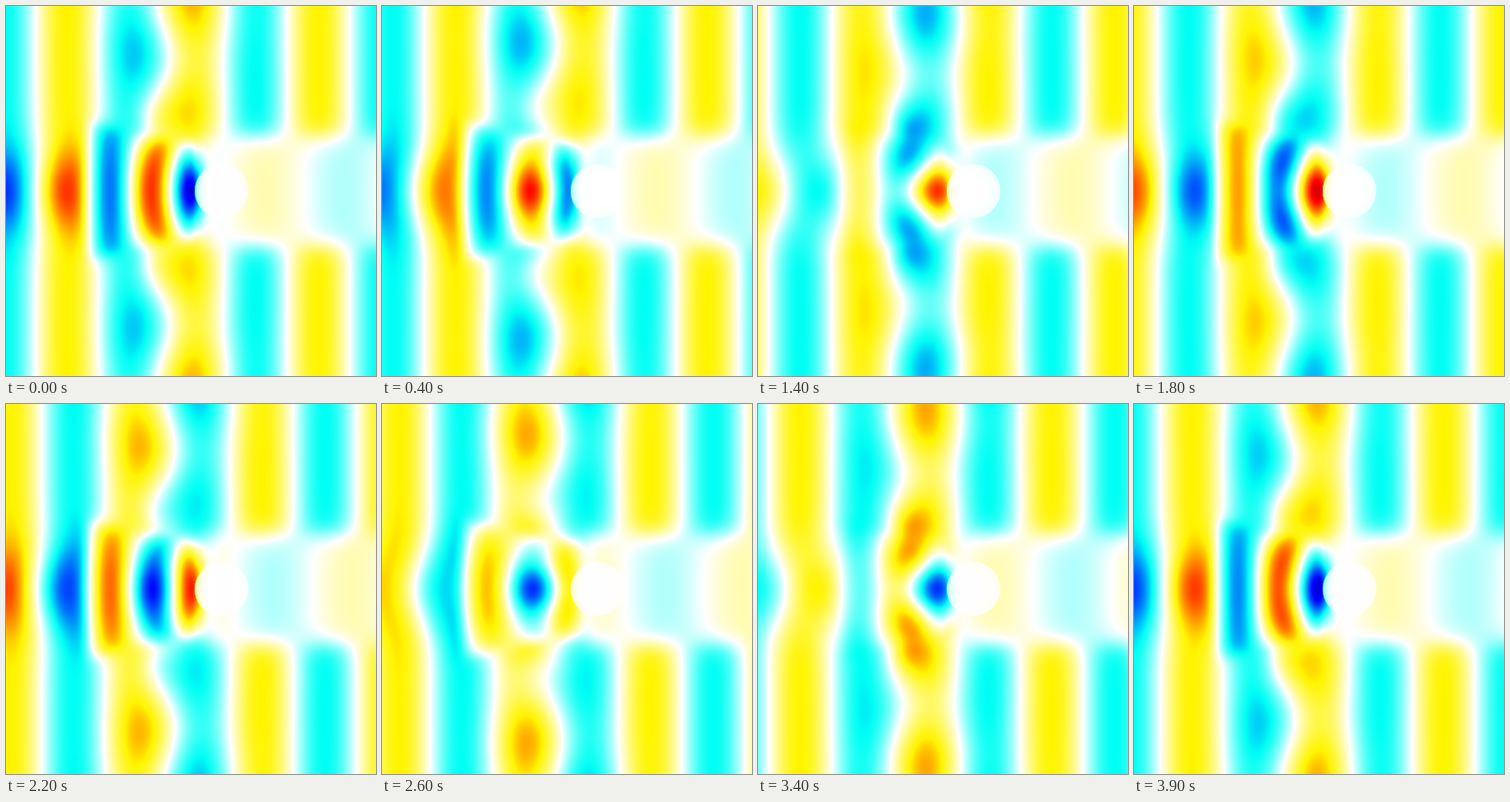
These frames come from a looping animation (400x400 px, 4000 ms). A matplotlib script:

```python
import numpy as np
import matplotlib.pyplot as plt
from matplotlib.animation import FuncAnimation
from matplotlib.colors import LinearSegmentedColormap

SIZE = 400
FRAMES = 40
INTERVAL = 100
K = 2 * np.pi / 136        # wave number of the open field
K_BLOCK = 2 * np.pi / 88   # shorter waves inside the block
BLOCK_X = 150
DISC_X, DISC_R = 233, 29


def step(v, softness):
    """Smooth switch from 0 to 1 as v passes zero."""
    return 0.5 + 0.5 * np.tanh(v / (2 * softness))


def bell(v, width):
    return np.exp(-(v / width) ** 2)


def mix(a, b, weight):
    return a + (b - a) * weight


def open_field():
    """Plane wave plus waves thrown sideways and straight back."""
    r = np.hypot(x - BLOCK_X, dy)
    cos_angle = (x - BLOCK_X) / np.maximum(r, 1)
    sideways = 68 / (r + 20) * bell(cos_angle - 0.15, 0.3)
    back = 0.8 * bell(dy, 45) * step(BLOCK_X - x, 10)
    return np.exp(1j * K * (x - 66)) + (sideways + back) * np.exp(1j * K * (r + 54))


def shadow_field():
    return 0.3 * np.exp(0.8j * K * (x - 280))


def block_field():
    """Standing wave that narrows and bends towards the disc."""
    bend = 12 * (dy / 50) ** 2 * step(x - 140, 12)
    height = 1.5 + 0.8 * (np.clip(x - 90, 0, 115) / 110) ** 2
    spread = 24 + np.maximum(205 - x, 0)
    standing = (height * np.exp(-(dy / spread) ** 2 / 2)
                * np.cos(K_BLOCK * (x - 68 - bend)))
    rim = -0.8 * np.tanh((x - 88 - dy ** 2 / 110) / 40)
    focus = 2.1 * bell(x - 176, 35) * bell(dy, 27)
    return standing + 1j * (rim + focus)


x, y = np.meshgrid(np.arange(SIZE) + 0.5, np.arange(SIZE) + 0.5)
dy = np.abs(y - SIZE / 2)

in_shadow = step(x - 215, 8) * step(60 - dy, 7)
in_block = (step(x - 82, 4) * step(215 - x, 5)
            * step(75 - 0.2 * (x - 90) - dy, 5))
field = mix(open_field(), shadow_field(), in_shadow)
field = mix(field, block_field(), in_block)

# The field drops sharply at the disc and fades out inside it.
depth = DISC_R - np.hypot(x - DISC_X, dy)
inside = np.clip(depth + 0.5, 0, 1)
field *= mix(1, 0.3 * np.exp(-np.maximum(depth, 0) / 6), inside)

cmap = LinearSegmentedColormap.from_list("wave", [
    (0.0, (0, 0, 0.65)), (0.1, (0, 0, 1)), (0.3, (0, 1, 0.96)),
    (0.5, (1, 1, 1)),
    (0.7, (1, 0.96, 0)), (0.9, (1, 0, 0)), (1.0, (0.65, 0, 0)),
], N=1024)

fig = plt.figure(figsize=(4, 4), dpi=100)
ax = fig.add_axes([0, 0, 1, 1])
ax.axis("off")
image = ax.imshow(field.real, cmap=cmap, vmin=-2.5, vmax=2.5,
                  interpolation="nearest", aspect="auto")


def update(frame):
    turn = np.exp(-2j * np.pi * frame / FRAMES)
    image.set_data((field * turn).real)
    return [image]


anim = FuncAnimation(fig, update, frames=FRAMES, interval=INTERVAL,
                     repeat=True, repeat_delay=0, blit=False)
plt.show()
```
